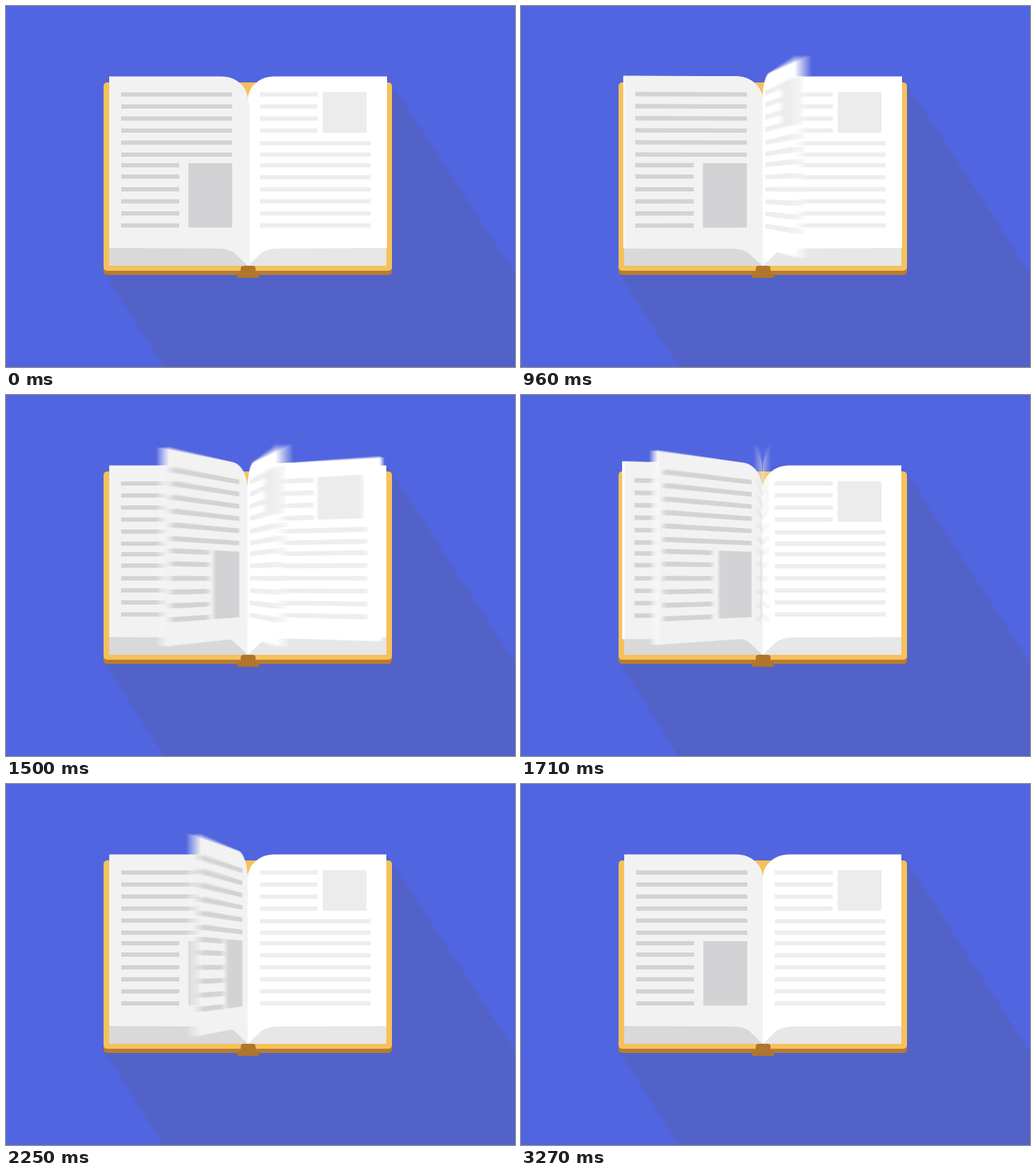
These frames come from a looping animation (720 px wide and 510 px high, 3450 ms). An HTML page with a canvas:

```html
<!DOCTYPE html>
<html lang="en">
<head>
<meta charset="utf-8">
<title>Book</title>
<style>
  html, body { margin: 0; width: 100%; height: 100%; overflow: hidden; background: #5165e0; }
  canvas { display: block; width: 720px; height: 510px; }
</style>
</head>
<body>
<canvas id="stage" width="720" height="510"></canvas>
<script>
const W = 720, H = 510, LOOP = 3450, STEP = 30;
const SHUTTER = 22, SAMPLES = 16;
const SPINE = 342, PIVOT = 341.5, MID = 259, PAGE = 196, DEPTH = 1176;

// Each turning page: start time and duration in ms
const turns = [
  [252, 741], [727, 765], [1135, 690], [1272, 734],
  [1427, 765], [1896, 765], [2503, 756]
].map(([start, dur]) => ({ start, dur }));

const main = document.getElementById('stage').getContext('2d');
const buffer = document.createElement('canvas');
buffer.width = W;
buffer.height = H;
const g = buffer.getContext('2d');

// Printed areas as [near, far, top, bottom], measured outward from the spine
const bars = (near, far, ys) => ys.map(y => [near, far, y - 3, y + 3]);
const backPrint = [
  ...bars(22, 179, [125, 142, 159, 176, 193, 210]),
  ...bars(97, 179, [225, 241, 259, 276, 293, 310]),
  [22, 84, 222, 313]
];
const frontLines = [
  ...bars(17, 99, [125, 142, 159, 176]),
  ...bars(17, 174, [194, 210, 225, 242, 259, 276, 293, 310])
];
const frontBlock = [[106, 168, 121.8, 179]];

function outline(width) {
  const pts = [[width, 99.4]];
  for (let i = 0; i <= 10; i++) {
    const a = i / 10 * Math.PI / 2;
    pts.push([37 - 37 * Math.sin(a), 132.5 - 33 * Math.cos(a)]);
  }
  pts.push([0, 367]);
  for (let i = 0; i <= 8; i++) {
    const k = i / 8, m = 1 - k;
    pts.push([
      m * m * 18 + 2 * m * k * 25 + k * k * 44,
      m * m * 350 + 2 * m * k * 343 + k * k * 342.4
    ]);
  }
  pts.push([width, 342]);
  return pts;
}

function poly(pts, color) {
  g.fillStyle = color;
  g.beginPath();
  pts.forEach(([x, y]) => g.lineTo(x, y));
  g.fill();
}

function box(x, y, w, h, r, color) {
  g.fillStyle = color;
  g.beginPath();
  g.roundRect(x, y, w, h, r);
  g.fill();
}

const flat = (spine, side) => ([u, y]) => [spine + side * u, y];

function turned(angle) {
  const c = Math.cos(angle), s = Math.sin(angle);
  return ([u, y]) => {
    const zoom = DEPTH / (DEPTH - u * s);
    return [PIVOT + u * c * zoom, MID + (y - MID) * zoom];
  };
}

function print(areas, place, color) {
  for (const [a, b, top, bottom] of areas) {
    poly([[a, top], [b, top], [b, bottom], [a, bottom]].map(place), color);
  }
}

function front(place, width) {
  poly(outline(width).map(place), '#ffffff');
  print(frontLines, place, '#eeeeef');
  print(frontBlock, place, '#ececec');
}

function back(place, trim) {
  if (trim) poly(outline(PAGE).map(place), '#ffffff');
  poly(outline(PAGE - trim).map(place), '#f2f2f2');
  print(backPrint, place, '#d3d3d5');
}

function drawCover() {
  g.fillStyle = '#5165e0';
  g.fillRect(0, 0, W, H);
  poly([[540, 102], [546, 110], [720, 378], [720, 510], [223, 510], [140, 379]], '#5262c9');
  box(138, 340, 408, 40, 5, '#b77b31');
  box(138, 108, 408, 266, 5, '#f6c15a');
  box(327, 377, 31, 7, 1, '#b1752b');
  box(332, 367, 21, 14, [4, 4, 0, 0], '#b1752b');
}

function drawScene(t) {
  const early = t < 1490;
  drawCover();
  poly([[146, 340], [SPINE, 340], [SPINE, 367], [146, 367]], '#d9d9da');
  poly([[SPINE, 340], [538, 340], [538, 367], [SPINE, 367]], '#e7e7e8');
  front(flat(SPINE, 1), t < 1200 ? PAGE + 1 : PAGE);
  back(flat(SPINE, -1), 0);
  if (early) poly([[341.5, 131], [345, 142], [345, 363], [342, 367]], '#f2f2f2');

  const moving = [];
  for (const { start, dur } of turns) {
    const rest = 1 - (t - start) / dur;
    if (rest > 0 && rest < 1) moving.push({ rest, angle: Math.PI * (1 - rest ** 1.5) });
  }
  const rising = moving.filter(p => p.angle < Math.PI / 2).reverse();
  const falling = moving.filter(p => p.angle >= Math.PI / 2);
  rising.forEach(p => front(turned(p.angle), PAGE));
  falling.forEach(p => back(turned(p.angle), 24 * p.rest));
}

// Averages several moments inside the shutter for motion blur
function render(t) {
  const still = t < 270 || t > 3270;
  const count = still ? 1 : SAMPLES;
  for (let k = 0; k < count; k++) {
    drawScene(t + ((k + 0.5) / count - 0.5) * SHUTTER);
    main.globalAlpha = 1 / (k + 1);
    main.drawImage(buffer, 0, 0);
  }
}

let origin = null, shown = -1;
function tick(now) {
  if (origin === null) origin = now;
  const t = Math.floor((now - origin) % LOOP / STEP) * STEP;
  if (t !== shown) {
    render(t);
    shown = t;
  }
  requestAnimationFrame(tick);
}
render(0);
requestAnimationFrame(tick);
</script>
</body>
</html>
```
